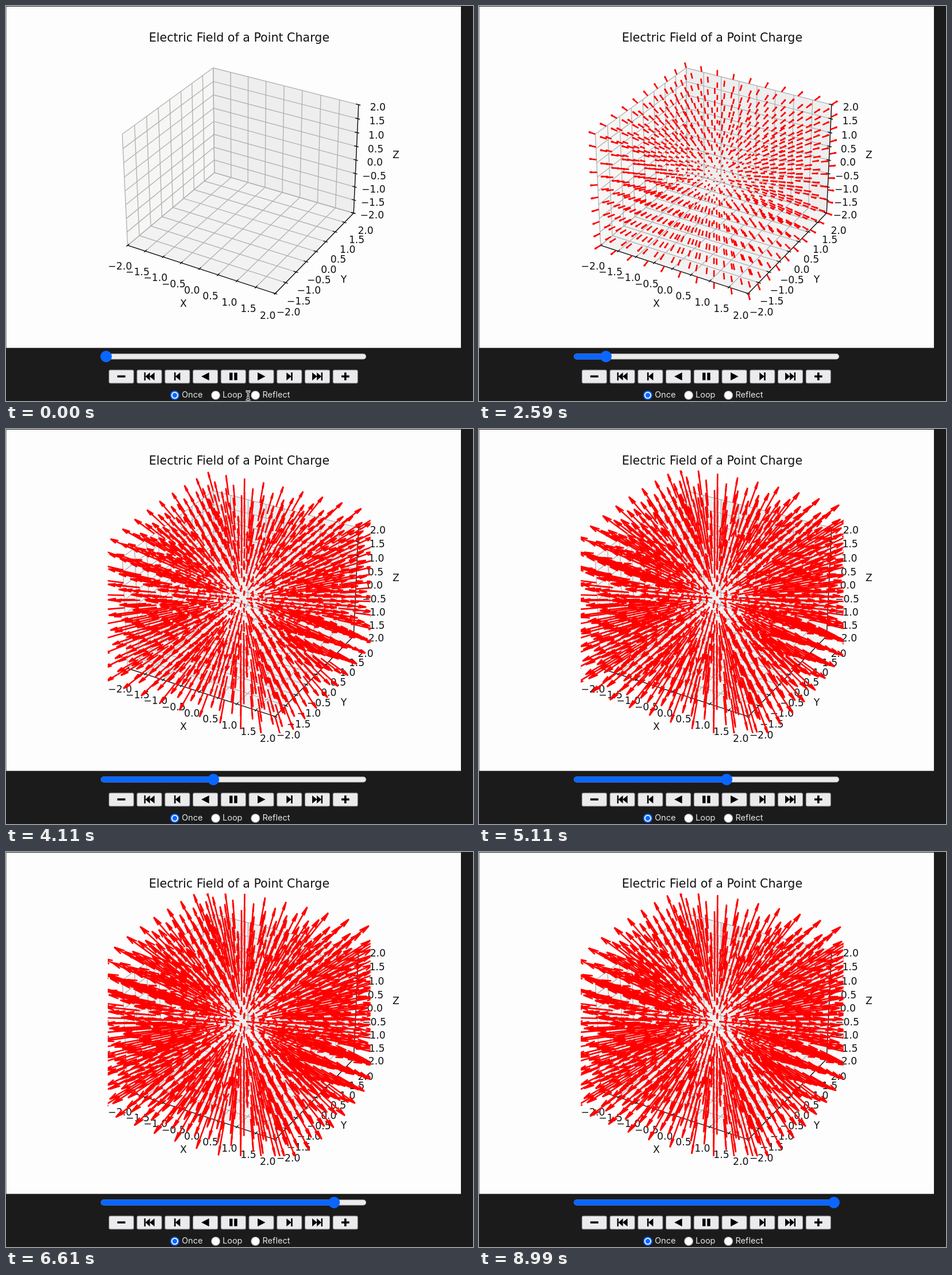
Write an HTML page with a canvas that moves like this. It is 813x688 px and loops after 9.09 s.

```html
<!DOCTYPE html>
<html lang="en">
<head>
<meta charset="utf-8">
<title>Electric Field of a Point Charge</title>
<style>
html, body { margin: 0; width: 100%; height: 100%; overflow: hidden; background: #1b1b1b; }
canvas { display: block; width: 813px; height: 688px; }
</style>
</head>
<body>
<canvas id="stage" width="813" height="688"></canvas>
<script>
const ctx = document.getElementById('stage').getContext('2d');
const LOOP = 9090, START = 1890, STEP = 270, LAST = 19;
const PT = 1.2375 * 100 / 72;
const AXES = { x: 177.2, y: 72.3, size: 457.4 };
const LIM = 2, N = 10, FIELD = 0.899;
const BLUE = '#0a66ff', LIGHT = '#ebebed', DARK = '#1b1b1b';
const TICKS = Array.from({ length: 9 }, (_, i) => -LIM + i / 2);

// Perspective camera: elevation 30°, azimuth -60°, distance 10, box aspect 4:4:3.
const UNIT = 1.8294640721620434 * 25 / 24 / Math.sqrt(41);
const C = Math.sqrt(3) / 2;
function project([px, py, pz]) {
  const x = px * UNIT, y = py * UNIT, z = pz * UNIT * 0.75;
  const depth = 10 - (C / 2 * x - 0.75 * y + 0.5 * z);
  const u = (C * x + 0.5 * y) / depth;
  const v = (-0.25 * x + C / 2 * y + C * z) / depth;
  const k = AXES.size / 0.185;
  return [AXES.x + (u + 0.095) * k, AXES.y + AXES.size - (v + 0.095) * k];
}

function trace(points) {
  points.forEach((p, i) => {
    const [x, y] = project(p);
    if (i) ctx.lineTo(x, y); else ctx.moveTo(x, y);
  });
}

function strokePath(points, color, width) {
  ctx.beginPath();
  trace(points);
  ctx.strokeStyle = color;
  ctx.lineWidth = width;
  ctx.stroke();
}

function pane(points, color) {
  ctx.beginPath();
  trace(points);
  ctx.closePath();
  ctx.fillStyle = color;
  ctx.fill();
}

function text(str, x, y, size, family, align, color) {
  ctx.font = `${size}px ${family}`;
  ctx.textAlign = align;
  ctx.fillStyle = color;
  ctx.fillText(str, x, y);
}

const plotText = (str, x, y, pt = 10) =>
  text(str, x, y, pt * PT, '"DejaVu Sans", sans-serif', 'center', '#111');

function tickLabel(value, pos) {
  const [x, y] = project(pos);
  plotText(value.toFixed(1).replace('-', '\u2212'), x, y + 14.3);
}

function drawAxes() {
  const L = LIM, thin = 0.8 * PT;
  pane([[-L, -L, -L], [-L, L, -L], [-L, L, L], [-L, -L, L]], '#f6f6f5');
  pane([[-L, L, -L], [L, L, -L], [L, L, L], [-L, L, L]], '#eeeeee');
  pane([[-L, -L, -L], [L, -L, -L], [L, L, -L], [-L, L, -L]], '#f2f2f2');

  for (const t of TICKS) {
    strokePath([[t, -L, -L], [t, L, -L], [t, L, L]], '#b2b2b4', thin);
    strokePath([[L, t, -L], [-L, t, -L], [-L, t, L]], '#b2b2b4', thin);
    strokePath([[-L, -L, t], [-L, L, t], [L, L, t]], '#b2b2b4', thin);
  }
  strokePath([[-L, -L, -L], [L, -L, -L], [L, L, -L], [L, L, L]], '#111', thin);

  const inner = L - 0.067, outer = L + 0.05, far = L + 0.34;
  for (const t of TICKS) {
    strokePath([[t, -inner, -L], [t, -outer, -L]], '#111', thin);
    strokePath([[inner, t, -L], [outer, t, -L]], '#111', thin);
    strokePath([[inner, L, t], [outer, L, t]], '#111', thin);
    tickLabel(t, [t, -far, -far]);
    tickLabel(t, [far, t, -far]);
    tickLabel(t, [far, far, t]);
  }
  plotText('X', 309, 523.5);
  plotText('Y', 588, 481.5);
  plotText('Z', 679, 265);
  plotText('Electric Field of a Point Charge', 405.9, 61.6, 12);
}

function arrow(x, y, z, len) {
  const r = Math.hypot(x, y, z), k = len / r;
  const d = [x * k, y * k, z * k];
  const tip = [x + d[0], y + d[1], z + d[2]];
  const h = Math.hypot(d[0], d[1]);
  const side = [-d[0] * d[2] / h, -d[1] * d[2] / h, h];
  const c = Math.cos(Math.PI / 12), s = Math.sin(Math.PI / 12);
  trace([[x, y, z], tip]);
  for (const sign of [1, -1]) {
    trace([tip, tip.map((p, i) => p - 0.3 * (c * d[i] + sign * s * side[i]))]);
  }
}

function drawField(len) {
  if (!len) return;
  const at = i => -LIM + 2 * LIM * i / (N - 1);
  ctx.save();
  ctx.beginPath();
  ctx.rect(AXES.x, AXES.y, AXES.size, AXES.size);
  ctx.clip();
  ctx.beginPath();
  for (let i = 0; i < N; i++)
    for (let j = 0; j < N; j++)
      for (let k = 0; k < N; k++) arrow(at(i), at(j), at(k), len);
  ctx.strokeStyle = '#ff0000';
  ctx.lineWidth = 1.5 * PT;
  ctx.stroke();
  ctx.restore();
}

function roundBox(x, y, w, h, r, color) {
  ctx.beginPath();
  ctx.roundRect(x, y, w, h, r);
  ctx.fillStyle = color;
  ctx.fill();
}

function disc(x, y, r, color) {
  ctx.beginPath();
  ctx.arc(x, y, r, 0, 2 * Math.PI);
  ctx.fillStyle = color;
  ctx.fill();
}

function drawSlider(frame) {
  const x = 174.3 + 443.6 * frame / LAST;
  roundBox(165, 605.5, 462, 10, 5, '#c4c4c8');
  roundBox(166, 606.5, 460, 8, 4, LIGHT);
  roundBox(165, 605.5, x - 165, 10, 5, BLUE);
  disc(x, 610.5, 10, BLUE);
}

// Icon parts are relative to the button centre.
const bar = (x, w, y = -7, h = 14) => ctx.fillRect(x, y, w, h);
function wedge(from, to, h = 7) {
  ctx.beginPath();
  ctx.moveTo(from, -h);
  ctx.lineTo(to, 0);
  ctx.lineTo(from, h);
  ctx.fill();
}
const icons = [
  () => bar(-7, 14, -1.8, 3.6),
  () => { bar(-9, 2.4); wedge(1, -7); wedge(9, 0.5); },
  () => { bar(-5.5, 2.6); wedge(5, -3.5); },
  () => wedge(6.5, -7),
  () => { bar(-6.8, 5.4, -6.5, 13); bar(1.4, 5.4, -6.5, 13); },
  () => wedge(-6.5, 7),
  () => { bar(2.9, 2.6); wedge(-5, 3.5); },
  () => { bar(6.6, 2.4); wedge(-1, 7); wedge(-9, -0.5); },
  () => { bar(-6.8, 13.6, -1.8, 3.6); bar(-1.8, 3.6, -6.8, 13.6); }
];

function drawButtons() {
  icons.forEach((icon, i) => {
    const x = 200.8 + 48.75 * i;
    roundBox(x - 22, 633.5, 44, 24, 3, '#8b8b8e');
    roundBox(x - 21, 634.5, 42, 22, 2, LIGHT);
    ctx.save();
    ctx.translate(x, 645.2);
    ctx.fillStyle = '#000';
    icon();
    ctx.restore();
  });
}

function drawModes() {
  [['Once', 293.8, 306], ['Loop', 365, 377], ['Reflect', 434.2, 446.5]].forEach(([name, x, left], i) => {
    disc(x, 678, 8, i ? '#8b8b8e' : BLUE);
    disc(x, 678, i ? 7 : 6, '#fff');
    if (!i) disc(x, 678, 4.2, BLUE);
    text(name, left, 682.2, 14.5, 'Inter, sans-serif', 'left', '#e6e6e6');
  });
}

function drawCursor(t) {
  if (t > 450) return;
  const p = Math.max(0, (t - 250) / 200);
  const x = 421.5 + 6 * p, y = 679 - 9 * p;
  ctx.beginPath();
  for (const s of [-1, 1]) {
    ctx.moveTo(x - 4, y + 8 * s);
    ctx.quadraticCurveTo(x, y + 8 * s, x, y + 5 * s);
    ctx.quadraticCurveTo(x, y + 8 * s, x + 4, y + 8 * s);
  }
  ctx.moveTo(x, y - 6);
  ctx.lineTo(x, y + 6);
  ctx.moveTo(x - 2.5, y + 3);
  ctx.lineTo(x + 2.5, y + 3);
  for (const [color, width] of [['#fff', 3.4], ['#111', 1.2]]) {
    ctx.strokeStyle = color;
    ctx.lineWidth = width;
    ctx.stroke();
  }
}

function draw(t) {
  const frame = Math.min(LAST, Math.max(0, Math.floor((t - START) / STEP)));
  ctx.fillStyle = DARK;
  ctx.fillRect(0, 0, 813, 688);
  ctx.fillStyle = '#fdfdfd';
  ctx.fillRect(0.5, 1, 791.5, 594.5);
  drawAxes();
  drawField(FIELD * Math.sin(frame / 10));
  drawSlider(frame);
  drawButtons();
  drawModes();
  drawCursor(t);
}

const origin = performance.now();
function tick() {
  draw((performance.now() - origin) % LOOP);
  requestAnimationFrame(tick);
}
tick();
</script>
</body>
</html>
```
